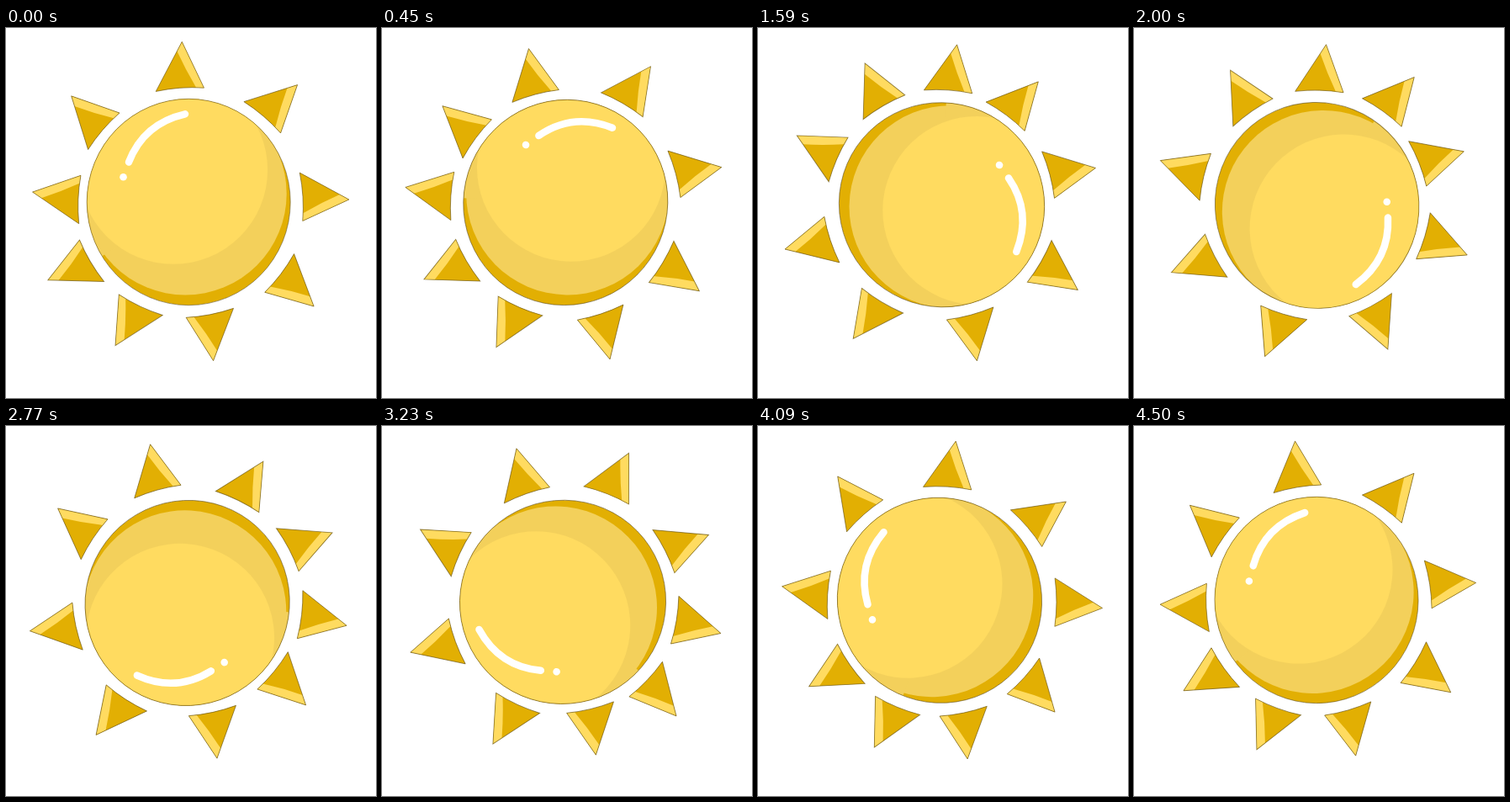
Recreate the animation shown at these times as an HTML page with a canvas. Size 440 by 440 pixels, loop 4550 ms.

```html
<!DOCTYPE html>
<html lang="en">
<head>
<meta charset="utf-8">
<title>Spinning sun</title>
<style>
  html, body { margin: 0; width: 100%; height: 100%; overflow: hidden; background: #fff; }
  canvas { display: block; width: 440px; height: 440px; }
</style>
</head>
<body>
<canvas id="stage" width="440" height="440"></canvas>
<script>
const ctx = document.getElementById('stage').getContext('2d');
const LOOP = 4550;
const TURN = Math.PI * 2;
const DARK = '#e2af03', MID = '#f3d05b', LIGHT = '#ffdb60';
const EDGE = 'rgba(95, 74, 10, 0.65)';
const PIVOT = { x: 217, y: 209 };

// The hand-placed rays: direction in degrees and distance of the tip.
const RAYS = [
  [222.6, 189.3], [267.7, 192.8], [312.5, 191.8],
  [358.5, 191], [39.3, 192.7], [81, 189],
  [117.3, 189.7], [151.5, 190.2], [184.3, 186]
];

const rad = deg => deg * Math.PI / 180;
const mix = (a, b, t) => ({ x: a.x + (b.x - a.x) * t, y: a.y + (b.y - a.y) * t });

function disc(x, y, r, color) {
  ctx.beginPath();
  ctx.arc(x, y, r, 0, TURN);
  ctx.fillStyle = color;
  ctx.fill();
}

function outline(path) {
  ctx.strokeStyle = EDGE;
  ctx.lineWidth = 0.9;
  ctx.stroke(path);
}

// One ray with its tip at the origin, pointing along +x; its clockwise side is lit.
const ray = (() => {
  const tip = { x: 0, y: 0 };
  const lit = { x: -55.8, y: 24 };
  const far = { x: -57.8, y: -33.4 };
  const base = { x: -52.8, y: -4.7 };
  const body = new Path2D();
  body.moveTo(tip.x, tip.y);
  body.lineTo(lit.x, lit.y);
  body.quadraticCurveTo(base.x, base.y, far.x, far.y);
  body.closePath();

  const near = mix(tip, far, 0.19);
  const foot = mix(lit, far, 0.17);
  const bend = mix(near, foot, 0.5);
  const strip = new Path2D();
  strip.moveTo(tip.x, tip.y);
  strip.lineTo(near.x, near.y);
  strip.quadraticCurveTo(bend.x, bend.y - 1, foot.x + 2, foot.y);
  strip.lineTo(foot.x - 4, foot.y);
  strip.lineTo(lit.x, lit.y);
  strip.closePath();
  return { body, strip };
})();

function drawRay([angle, distance]) {
  ctx.save();
  ctx.translate(PIVOT.x, PIVOT.y);
  ctx.rotate(rad(angle));
  ctx.translate(distance, 0);
  ctx.fillStyle = DARK;
  ctx.fill(ray.body);
  ctx.save();
  ctx.clip(ray.body);
  ctx.fillStyle = LIGHT;
  ctx.fill(ray.strip);
  ctx.restore();
  outline(ray.body);
  ctx.restore();
}

const ball = new Path2D();
ball.ellipse(217.2, 207, 121, 122.7, 0, 0, TURN);

function drawBall() {
  ctx.save();
  ctx.clip(ball);
  ctx.fillStyle = DARK;
  ctx.fill(ball);
  disc(213.2, 197, 120.5, MID);
  // The dark rim stops abruptly at the lower left.
  ctx.beginPath();
  ctx.moveTo(217, 207);
  ctx.arc(217, 207, 130, rad(148), rad(325));
  ctx.fillStyle = MID;
  ctx.fill();
  disc(199.1, 168.8, 112, LIGHT);
  ctx.restore();
  outline(ball);
}

function drawShine() {
  ctx.beginPath();
  ctx.moveTo(213, 102.3);
  ctx.quadraticCurveTo(163.7, 113.5, 146, 159.5);
  ctx.strokeStyle = '#fff';
  ctx.lineWidth = 8.5;
  ctx.lineCap = 'round';
  ctx.stroke();
  disc(139.5, 177.2, 4.3, '#fff');
}

// 136 poses per turn, shown at 22 pictures per second with uneven steps.
function poseAngle(ms) {
  const tick = Math.floor((ms % LOOP) / 10);
  const picture = Math.floor((tick + 0.5) * 0.22);
  const pose = Math.max(0, Math.floor((15 * picture - 3.5) / 11));
  return pose / 136 * TURN;
}

function draw(ms) {
  ctx.fillStyle = '#fff';
  ctx.fillRect(0, 0, 440, 440);
  ctx.save();
  ctx.translate(PIVOT.x, PIVOT.y);
  ctx.rotate(poseAngle(ms));
  ctx.translate(-PIVOT.x, -PIVOT.y);
  RAYS.forEach(drawRay);
  drawBall();
  drawShine();
  ctx.restore();
}

let start;
function loop(now) {
  start ??= now;
  draw(Math.max(0, now - start));
  requestAnimationFrame(loop);
}
draw(0);
requestAnimationFrame(loop);
</script>
</body>
</html>
```
